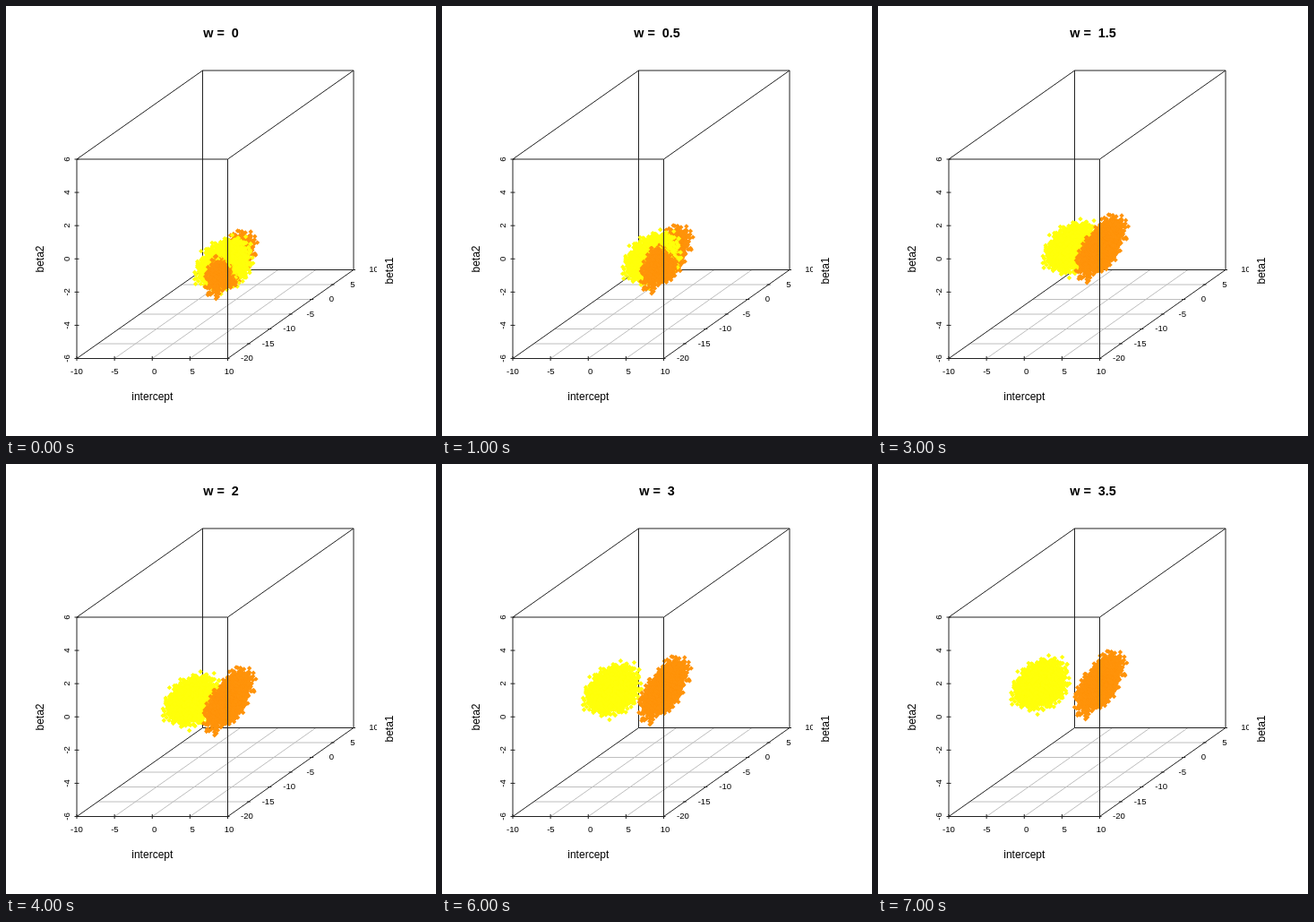
An HTML page with a canvas that plays this animation: 480x480 px, repeating every 8000 ms.

```html
<!DOCTYPE html>
<html lang="en">
<head>
<meta charset="utf-8">
<title>Coefficient clouds</title>
<style>
  html, body { margin: 0; width: 100%; height: 100%; overflow: hidden; background: #fff; }
  svg, canvas { position: absolute; left: 0; top: 0; width: 480px; height: 480px; }
  text { font-family: "Liberation Sans", Arial, sans-serif; text-anchor: middle; fill: #000; }
  .tick { font-size: 9.6px; }
  .name { font-size: 12px; }
  .title { font-size: 14.4px; font-weight: bold; white-space: pre; }
  path { fill: none; stroke: #222; stroke-width: 1; }
  .grid { stroke: #bebebe; }
</style>
</head>
<body>
<svg id="back" viewBox="0 0 480 480">
  <clipPath id="edge"><rect width="414" height="480"/></clipPath>
  <path class="grid" id="grid"/>
  <path d="M79 393.5H247.5L388 294.5H219.5ZM79 393.5V171L219.5 72H388V294.5M219.5 72V294.5"/>
  <path id="ticks"/>
  <g id="labels" class="tick" clip-path="url(#edge)"></g>
  <text class="name" x="163.3" y="440">intercept</text>
  <text class="name" transform="translate(42 282.5) rotate(-90)">beta2</text>
  <text class="name" transform="translate(432 295.5) rotate(-90)">beta1</text>
  <text class="title" id="title" x="240" y="35" xml:space="preserve"></text>
</svg>
<canvas id="cloud" width="480" height="480"></canvas>
<svg id="front" viewBox="0 0 480 480">
  <path d="M79 171H247.5L388 72M247.5 171V393.5"/>
</svg>
<script>
const STEP = 1000, STEPS = 8, COUNT = 5000, SIZE = 2.7;
const $ = id => document.getElementById(id);

function drawAxes() {
  let grid = "", ticks = "", labels = "";
  const label = (s, x, y, turn = 0) =>
    labels += `<text transform="translate(${x} ${y}) rotate(${turn})">${s}</text>`;

  const offsets = [0, 0.3, 2.5, 2.8, 1.5];
  for (let i = 0; i <= 4; i++) {
    const x = 79 + 42.125 * i;
    ticks += `M${x} 391V396`;
    label(i * 5 - 10, x + offsets[i], 411);
    if (i % 4) grid += `M${x} 393.5l140.5 -99`;
  }
  for (let i = 0; i <= 6; i++) {
    const y = 393.5 - 16.5 * i, dx = 23.42 * i;
    ticks += `M${245.5 + dx} ${y}h4`;
    label(i * 5 - 20, 269 + 23.6 * i, y + 2.9);
    if (i % 6) grid += `M${79 + dx} ${y}h168.5`;
  }
  for (let i = 0; i <= 6; i++) {
    const y = 393.5 - 37.08 * i;
    ticks += `M76.5 ${y}h5`;
    label(i * 2 - 6, 70.5, y, -90);
  }
  $("grid").setAttribute("d", grid);
  $("ticks").setAttribute("d", ticks);
  $("labels").innerHTML = labels;
}

function random(seed) {
  return () => {
    seed = seed + 0x6D2B79F5 | 0;
    let t = Math.imul(seed ^ seed >>> 15, 1 | seed);
    t = t + Math.imul(t ^ t >>> 7, 61 | t) ^ t;
    return ((t ^ t >>> 14) >>> 0) / 4294967296;
  };
}

// Each point has an offset from the cloud's centre and a depth along beta1.
function makeCloud({ seed, sx, sy, tilt, slope }) {
  const rnd = random(seed), points = [];
  while (points.length < COUNT) {
    const r = Math.sqrt(-2 * Math.log(1 - rnd())), a = rnd() * 2 * Math.PI;
    const noise = (rnd() + rnd() + rnd() - 1.5) * 4;
    if (r > 3.7) continue;
    const u = r * Math.cos(a), v = r * Math.sin(a);
    const x = sx * u, y = -sy * (tilt * u + Math.sqrt(1 - tilt * tilt) * v);
    points.push({ x, y, depth: slope * (0.82 * x - 0.58 * y) + noise });
  }
  return points;
}

const clouds = [
  { color: "#ff930a", seed: 11, sx: 8.6, sy: 11, tilt: 0.6, slope: 1,
    at: w => [250.5 - 0.8 * w, 287.4 - 12 * w, 0] },
  { color: "#ffff0a", seed: 29, sx: 9.9, sy: 9.4, tilt: 0.26, slope: 0.4,
    at: w => [243.8 - 17.7 * w, 288.4 - 12 * w, 3 * w - 5] }
];
for (const c of clouds) c.points = makeCloud(c);

const ctx = $("cloud").getContext("2d");

function drawClouds(w) {
  const all = clouds.flatMap(c => {
    const [cx, cy, far] = c.at(w);
    return c.points.map(p => ({ x: cx + p.x, y: cy + p.y, depth: far + p.depth, color: c.color }));
  });
  all.sort((a, b) => b.depth - a.depth);
  ctx.clearRect(0, 0, 480, 480);
  for (const { x, y, color } of all) {
    ctx.fillStyle = color;
    ctx.beginPath();
    ctx.moveTo(x - SIZE, y);
    ctx.lineTo(x, y - SIZE);
    ctx.lineTo(x + SIZE, y);
    ctx.lineTo(x, y + SIZE);
    ctx.fill();
  }
}

let shown = -1;
function update(time) {
  const step = Math.floor(time / STEP) % STEPS;
  if (step === shown) return;
  shown = step;
  const w = step / 2;
  $("title").textContent = `w =  ${w}`;
  drawClouds(w);
}

drawAxes();
update(0);
const start = performance.now();
function loop() {
  update(performance.now() - start);
  requestAnimationFrame(loop);
}
requestAnimationFrame(loop);
</script>
</body>
</html>
```
